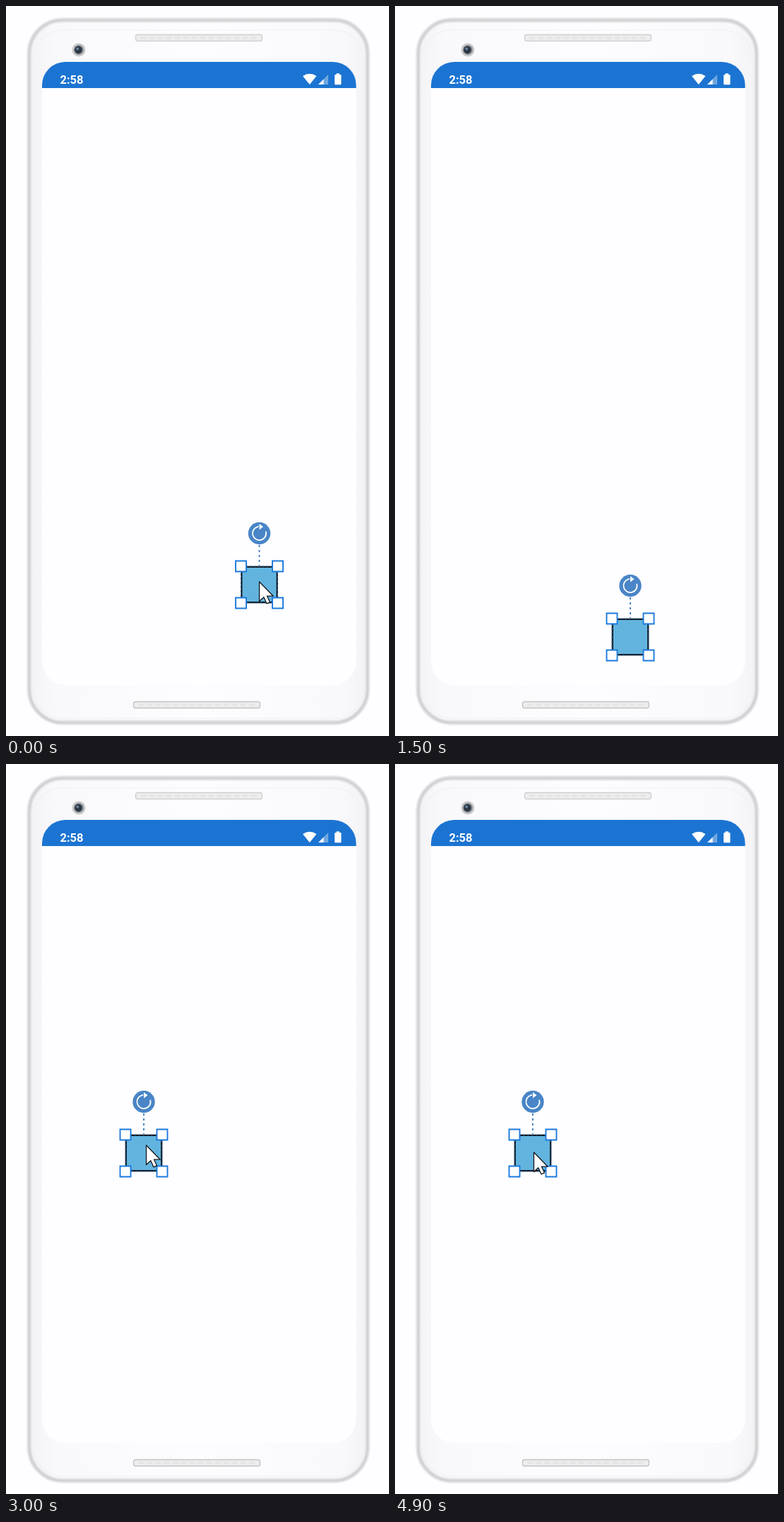
These frames come from a looping animation (542x1032 px, 5000 ms). An HTML page with a canvas:

```html
<!DOCTYPE html>
<html lang="en">
<head>
<meta charset="utf-8">
<title>Dragging a shape on a phone</title>
<style>
html, body { margin: 0; width: 100%; height: 100%; overflow: hidden; background: #fefdff; }
canvas { display: block; }
</style>
</head>
<body>
<canvas id="stage" width="542" height="1032"></canvas>
<script>
const ctx = document.getElementById('stage').getContext('2d');
const LOOP = 5000, STEP = 100;
const BLUE = '#1c74d2', KNOB = '#4985c7', PAPER = '#fefdff';

// Resting places of the shape, and the far ends of its drags.
const LOWER = [358.5, 818], UPPER = [195, 550];
const RIGHT = [465, 861], BOTTOM = [333, 892], SIDE = [465, 646];
// Places where the free cursor pauses.
const BESIDE = [311, 797], GRIP = [358, 814], LET_GO = [198, 539];
const AWAY = [394, 683], HOVER = [196, 549];

const progress = (t, t0, t1) => Math.min(1, Math.max(0, (t - t0) / (t1 - t0)));
const smooth = k => k * k * (3 - 2 * k);
const mix = (a, b, k) => a.map((v, i) => v + (b[i] - v) * k);
const glide = (t, t0, t1, a, b) => mix(a, b, smooth(progress(t, t0, t1)));

function boxAt(t) {
  if (t < 400) return glide(t, 0, 400, LOWER, RIGHT);
  if (t < 1800) {
    const k = progress(t, 400, 1500);
    const [x, y] = mix(RIGHT, BOTTOM, smooth(k));
    return [x, y + 18 * Math.sin(Math.PI * k * k)];
  }
  if (t < 3100) return glide(t, 2600, 3000, LOWER, UPPER);
  if (t < 3500) return glide(t, 3050, 3400, UPPER, SIDE);
  return UPPER;
}

// The cursor is hidden while the shape is being dragged.
function cursorAt(t) {
  if (t < 100) return GRIP;
  if (t < 1800) return null;
  if (t <= 2400) return glide(t, 1800, 2400, BOTTOM, BESIDE);
  if (t < 2700) return glide(t, 2400, 2600, BESIDE, GRIP);
  if (t < 3000) return null;
  if (t < 3100) return LET_GO;
  if (t < 3500) return null;
  return mix(AWAY, HOVER, progress(t, 4300, 4900));
}

function paint(fill, stroke, width = 1) {
  if (fill) { ctx.fillStyle = fill; ctx.fill(); }
  if (stroke) { ctx.strokeStyle = stroke; ctx.lineWidth = width; ctx.stroke(); }
}

function round(x, y, w, h, r, fill, stroke, width) {
  ctx.beginPath();
  ctx.roundRect(x, y, w, h, r);
  paint(fill, stroke, width);
}

function square(x, y, half, fill, stroke, width) {
  round(x - half, y - half, half * 2, half * 2, 0, fill, stroke, width);
}

function disc(x, y, r, fill) {
  ctx.beginPath();
  ctx.arc(x, y, r, 0, Math.PI * 2);
  paint(fill);
}

function poly(points, fill, stroke, width) {
  ctx.beginPath();
  points.forEach(([x, y]) => ctx.lineTo(x, y));
  ctx.closePath();
  paint(fill, stroke, width);
}

function speaker(x, y, edge) {
  round(x + .5, y + .5, 179, 9, 3, '#ededee', edge, 1.3);
  for (let i = 0; i < 14; i++) round(x + 7 + i * 12, y + 3, 9, 4, 2, '#e6e6e7');
}

function phone() {
  const body = ctx.createLinearGradient(31, 0, 513, 0);
  body.addColorStop(0, '#f3f2f4');
  body.addColorStop(.08, '#f9f8fb');
  body.addColorStop(.5, '#fdfcfe');
  body.addColorStop(.92, '#f9f8fb');
  body.addColorStop(1, '#f3f2f4');
  round(33, 20, 478.5, 993, 47, body, '#eeedef', 8);
  round(33, 20, 478.5, 993, 47, null, '#dedee0', 5);
  round(33, 20, 478.5, 993, 47, null, '#d2d2d4', 2.6);
  round(38, 34, 468, 973, 42, null, '#f1f0f2', 1.2);
  speaker(183, 40, '#cfcfd0');
  speaker(180, 983, '#c2c2c3');

  disc(103, 62, 9.5, '#cbcbcb');
  disc(103, 62, 7, '#8d9297');
  disc(102.5, 62, 5.4, '#2d3744');
  disc(101.2, 60.5, 2, '#66809b');
}

function screen() {
  round(51, 79, 444.5, 881, 33, PAPER);
  ctx.save();
  ctx.clip();
  ctx.fillStyle = BLUE;
  ctx.fillRect(51, 79, 445, 37);
  ctx.restore();

  ctx.fillStyle = '#fff';
  ctx.font = '700 16.5px Roboto, sans-serif';
  ctx.fillText('2:58', 76.5, 110);

  ctx.beginPath();
  ctx.moveTo(429.7, 111);
  ctx.lineTo(420, 99);
  ctx.quadraticCurveTo(429.7, 92.5, 439.4, 99);
  ctx.closePath();
  paint('#fff');
  poly([[442, 111], [456, 111], [456, 97]], '#6fa7e1');
  poly([[442, 111], [449.5, 111], [449.5, 103.5]], '#fff');
  round(465, 97, 9.4, 14.3, 1.2, '#fff');
  ctx.fillRect(467.5, 95.3, 4.4, 2.5);
}

function knob(x, y) {
  disc(x, y, 15.7, KNOB);
  ctx.beginPath();
  ctx.arc(x, y, 9.6, -.3, Math.PI * 1.47);
  paint(null, '#fff', 1.8);
  poly([[x, y - 13.5], [x + 5.5, y - 9.3], [x, y - 5]], '#fff');
}

function shape(x, y) {
  ctx.save();
  round(51, 79, 444, 881, 33);
  ctx.clip();
  ctx.setLineDash([3, 4]);
  ctx.beginPath();
  ctx.moveTo(x, y - 56);
  ctx.lineTo(x, y - 27);
  paint(null, KNOB, 2);
  ctx.setLineDash([]);
  knob(x, y - 72.5);
  square(x, y, 25.2, '#62b4df', '#10151b', 2.2);
  ctx.setLineDash([3, 3]);
  square(x, y, 26, null, '#3f83c4', 1);
  ctx.setLineDash([]);
  for (const dx of [-26, 26])
    for (const dy of [-26, 26]) square(x + dx, y + dy, 7.5, '#fff', '#1b7ade', 1.9);
  ctx.restore();
}

function cursor(x, y) {
  ctx.save();
  ctx.translate(x + .5, y);
  ctx.lineJoin = 'round';
  poly([[0, 0], [0, 27.5], [6.3, 21.8], [10.4, 30.8], [15, 28.8], [11, 20.2], [19.7, 20.2]],
    '#fff', '#15151a', 1.3);
  ctx.restore();
}

function frame(now) {
  const t = Math.floor((now % LOOP) / STEP) * STEP;
  ctx.fillStyle = PAPER;
  ctx.fillRect(0, 0, 542, 1032);
  phone();
  screen();
  shape(...boxAt(t));
  const tip = cursorAt(t);
  if (tip) cursor(...tip);
}

const start = performance.now();
function tick() {
  frame(performance.now() - start);
  requestAnimationFrame(tick);
}
tick();
</script>
</body>
</html>
```
